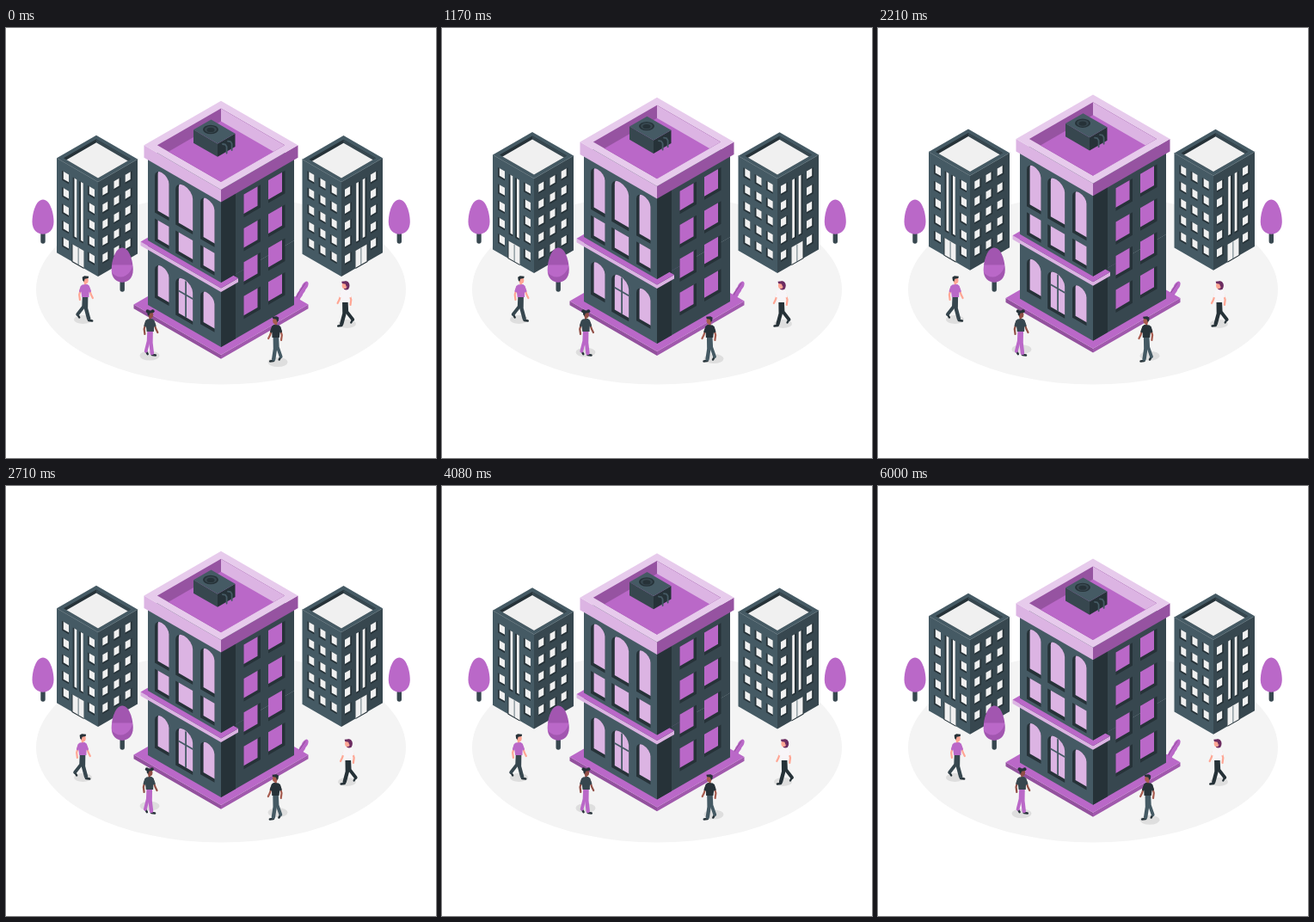
These frames come from a looping animation (500 px wide and 500 px high, 6.04 s). An HTML page with a canvas:

```html
<!DOCTYPE html>
<html lang="en">
<head>
<meta charset="utf-8">
<title>City block</title>
<style>
html, body { margin: 0; width: 100%; height: 100%; overflow: hidden; background: #fff; }
canvas { display: block; width: 100vw; height: 100vh; }
</style>
</head>
<body>
<canvas id="stage"></canvas>
<script>
const canvas = document.getElementById('stage');
const ctx = canvas.getContext('2d');
const LOOP = 6040, RISE = 10, SLOPE = 0.577;
const PURPLE = '#ba68c8', LILAC = '#dcb4e3', PALE = '#e7cbec', PLUM = '#9653a1';
const INK = '#263238', SLATE = '#37474f', STEEL = '#455a64', PAPER = '#f0f0f0';
const SHADOW = '#dedede', ROSE = '#ffa694';

function poly(color, ...p) {
  ctx.fillStyle = color;
  ctx.beginPath();
  for (let i = 0; i < p.length; i += 2) ctx.lineTo(p[i], p[i + 1]);
  ctx.closePath();
  ctx.fill();
}

function line(color, width, ...p) {
  ctx.strokeStyle = color;
  ctx.lineWidth = width;
  ctx.lineCap = ctx.lineJoin = 'round';
  ctx.beginPath();
  for (let i = 0; i < p.length; i += 2) ctx.lineTo(p[i], p[i + 1]);
  ctx.stroke();
}

function oval(color, x, y, rx, ry = rx, turn = 0) {
  ctx.fillStyle = color;
  ctx.beginPath();
  ctx.ellipse(x, y, rx, ry, turn, 0, 7);
  ctx.fill();
}

function rect(color, x, y, w, h) {
  ctx.fillStyle = color;
  ctx.fillRect(x, y, w, h);
}

function group(x, y, draw) {
  ctx.save();
  ctx.translate(x, y);
  draw();
  ctx.restore();
}

// Isometric diamond given by its front corner and the widths of both sides
function diamond(color, x, y, left, right) {
  poly(color, x, y, x - left, y - left * SLOPE,
    x + right - left, y - (left + right) * SLOPE, x + right, y - right * SLOPE);
}

function box(x, y, left, right, h, top, lit, dark) {
  poly(lit, x, y, x - left, y - left * SLOPE, x - left, y - left * SLOPE + h, x, y + h);
  poly(dark, x, y, x + right, y - right * SLOPE, x + right, y - right * SLOPE + h, x, y + h);
  diamond(top, x, y, left, right);
}

// Sunken roof inside a rim
function well(x, y, left, right, rim, depth, floor, lit, dark) {
  left -= rim;
  right -= rim;
  y -= rim * SLOPE;
  const bx = x + right - left, by = y - (left + right) * SLOPE;
  diamond(dark, x, y, left, right);
  ctx.save();
  ctx.clip();
  poly(lit, bx, by, x + right, y - right * SLOPE, x + right, y + depth, bx, y + depth);
  diamond(floor, x, y + depth, left, right);
  ctx.restore();
}

// Wall plane measured outward from the front corner; side is -1 or 1
function wall(x, y, side, draw) {
  ctx.save();
  ctx.transform(side, -SLOPE, 0, 1, x, y);
  draw();
  ctx.restore();
}

// Opening with glass set back by d, so the reveal and sill show
function opening(glass, u, v, w, h, d, arched) {
  const r = arched ? w / 2 : 0;
  const shape = color => {
    ctx.fillStyle = color;
    ctx.beginPath();
    ctx.roundRect(u, v, w, h, [r, r, 0, 0]);
    ctx.fill();
  };
  ctx.save();
  shape(INK);
  ctx.clip();
  ctx.translate(-d, -2 * SLOPE * d);
  shape(glass);
  ctx.restore();
}

function tree(x, y, shaded) {
  line(SLATE, 5.4, x, y + 32, x, y + 48.5);
  ctx.fillStyle = PURPLE;
  ctx.beginPath();
  ctx.moveTo(x, y);
  ctx.bezierCurveTo(x + 8, y, x + 12.5, y + 15, x + 12.5, y + 26);
  ctx.bezierCurveTo(x + 12.5, y + 45, x - 12.5, y + 45, x - 12.5, y + 26);
  ctx.bezierCurveTo(x - 12.5, y + 15, x - 8, y, x, y);
  ctx.fill();
  if (!shaded) return;
  ctx.save();
  ctx.clip();
  ctx.fillStyle = 'rgba(90,35,105,.25)';
  ctx.beginPath();
  ctx.rect(x - 13, y + 20, 26, 25);
  ctx.ellipse(x - 2, y + 14, 15, 20, 0, 0, 7);
  ctx.fill('evenodd');
  ctx.restore();
}

function officeWindows() {
  for (let col = 0; col < 3; col++)
    for (let row = 0; row < 5; row++)
      opening(PAPER, 5.3 + col * 13.2, 10 + row * 19.4, 7.8, 10.8, 1.8);
}

function entranceSide() {
  for (const u of [4, 34])
    for (let row = 0; row < 5; row++) opening(PAPER, u, 11 + row * 19.3, 8, 11, 1.8);
  for (const u of [17.2, 24.7]) opening(PAPER, u, 11.5, 4.6, 70, 1.8);
  opening(PAPER, 16.5, 89.5, 14, 21, 1);
  rect(STEEL, 22.5, 90, 0.8, 20);
}

function tower(x, left, right, entrance) {
  const y = 179;
  box(x, y, left, right, 110, STEEL, STEEL, SLATE);
  well(x, y, left, right, 8, 4, PAPER, SLATE, INK);
  line('#566970', 0.5, x - left, y - left * SLOPE, x, y, x + right, y - right * SLOPE);
  for (const side of [-1, 1])
    wall(x, y, side, side === entrance ? entranceSide : officeWindows);
}

function arcade() {
  for (const [u, w] of [[7.5, 16.5], [32.8, 20], [60.5, 16.5]]) {
    opening(LILAC, u, 8, w, 51, 3.6, true);
    opening(LILAC, u, 66, w, 26, 3.6);
    opening(LILAC, u, 117, w, w > 17 ? 47 : 41, 3.6, true);
  }
  rect(STEEL, 40, 118, 1.8, 42);
  rect(STEEL, 32.8, 133, 16.5, 2);
}

function sideWindows() {
  for (const u of [26.5, 55])
    for (let row = 0; row < 4; row++)
      opening(PURPLE, u, 8.8 + row * 39.4, 19.5, 26.5, 3.5);
}

function storey(y, h) {
  box(250, y, 85, 85, h, STEEL, STEEL, SLATE);
  wall(250, y, 1, () => rect(INK, 0, 0, 17, h));
}

function roofUnit() {
  box(246, 134.5, 28, 20.5, 15.3, STEEL, SLATE, INK);
  oval(INK, 238, 118, 9, 5.2);
  oval(SLATE, 238, 118, 7, 4);
  oval(INK, 238, 118.4, 4.5, 2.6);
  for (const x of [252, 258]) {
    const y = 135 - (x - 252) * SLOPE;
    line(STEEL, 1.8, x, y, x + 3, y + 0.5, x + 4.6, y + 3, x + 4.6, y + 10.5);
  }
}

function mainBlock() {
  box(250, 380, 101.5, 101.5, 4.8, PURPLE, '#93519e', '#a159ad');
  storey(296, 75);
  box(250, 302.5, 93.5, 20, 4.5, PURPLE, LILAC, LILAC);
  storey(200, 96);
  wall(250, 200, -1, arcade);
  wall(250, 200, 1, sideWindows);
  box(250, 188, 89.5, 89.5, 14.5, PALE, LILAC, PLUM);
  well(250, 188, 89.5, 89.5, 15.4, 15, PURPLE, LILAC, PLUM);
  roofUnit();
  oval(SHADOW, 167, 381, 11.5, 5.5);
  oval(SHADOW, 316, 388.5, 11.5, 5.5);
}

function plant() {
  for (let i = 0; i < 4; i++) oval(PURPLE, 338.5 + i * 3, 315 - i * 5, 3.2, 6, 0.55);
  line('#87468f', 0.8, 335, 319, 341, 307, 348, 297);
}

// Drawn around the centre of the head, walking right for dir 1
function walker(x, y, dir, stride, look) {
  const { skin, shirt, pants, hair } = look;
  group(x, y, () => {
    ctx.scale(dir, 1);
    const back = -9 * stride, heel = 46 - 6 * stride, front = 4 * stride;
    line(INK, 2.4, back, heel, back + 2, heel + 3.5);
    line(INK, 2.6, front, 47, front + 4, 47.5);
    line(pants, 3.8, -1.5, 20, -2, 31, back, heel);
    line(pants, 4.4, 1, 20, 0.8, 33, front, 45);
    line(skin, 2.2, -5, 10, -7, 17, -6.2, 23);
    line(skin, 2.2, 4.5, 10, 6.7, 17, 8.7, 21);
    line(skin, 2.6, 0, 2, 0, 6);
    poly(shirt, -3.5, 5.5, 2.5, 5, 4.7, 7, 4.3, 20, -4, 20, -5.5, 8);
    line(shirt, 2.8, -4.2, 8, -5.8, 13);
    line(shirt, 2.8, 3.6, 8, 5.4, 13);
    if (look.long) oval(hair, -1.4, 0.6, 3.8, 5);
    if (look.buns) for (const s of [-1, 1]) oval(hair, s * 3, -3.7, 2);
    oval(skin, 0.7, 0.4, 2.9, 3.6);
    poly(hair, -3.5, -3.2, -1, -4.8, 4, -4.3, 3.5, -2, -0.5, -1.3, -1.5, 2, -3, 0.5);
  });
}

// Sideways sway around a middle, at its crest when p equals peak
function sway(p, middle, reach, cycles, peak) {
  return middle + reach * Math.cos(2 * Math.PI * cycles * (p - peak));
}

function people(p) {
  walker(90.5 + sway(p, 0, 1.8, 1, 0.06), 293, 1, 1,
    { skin: ROSE, shirt: PURPLE, pants: SLATE, hair: INK });
  walker(167 - sway(p, 0, 1.3, 2, 0.834), 333, 1, 0.55,
    { skin: '#914f46', shirt: SLATE, pants: PURPLE, hair: INK, buns: true });
  walker(312.3 + sway(p, 0, 1.5, 2, 0), 340, -1, 0.65,
    { skin: '#a85d50', shirt: INK, pants: STEEL, hair: INK });
  walker(396.2 + sway(p, 0, 2.2, 1, 0.58), 299, -1, 1,
    { skin: ROSE, shirt: '#f8f5f8', pants: INK, hair: '#6c2c61', long: true });
}

function draw(p) {
  const lift = -RISE * (1 - Math.abs(2 * p - 1));
  rect('#fff', 0, 0, 500, 500);
  oval('#f4f4f4', 250, 304, 215, 110.5);
  for (const x of [43, 457.3]) tree(x, 199.5);
  plant();
  oval(SHADOW, 89.5, 339, 10.5, 5);
  oval(SHADOW, 396.5, 344, 10.5, 5);
  group(0, lift, () => {
    tower(107, 48, 46, -1);
    tower(390, 45.5, 48, 1);
    mainBlock();
  });
  tree(135.2, 255.5, true);
  people(p);
}

function frame() {
  const ratio = window.devicePixelRatio || 1;
  const w = Math.round(innerWidth * ratio), h = Math.round(innerHeight * ratio);
  if (canvas.width !== w || canvas.height !== h) {
    canvas.width = w;
    canvas.height = h;
  }
  ctx.setTransform(w / 500, 0, 0, h / 500, 0, 0);
  draw(performance.now() % LOOP / LOOP);
  requestAnimationFrame(frame);
}
frame();
</script>
</body>
</html>
```
